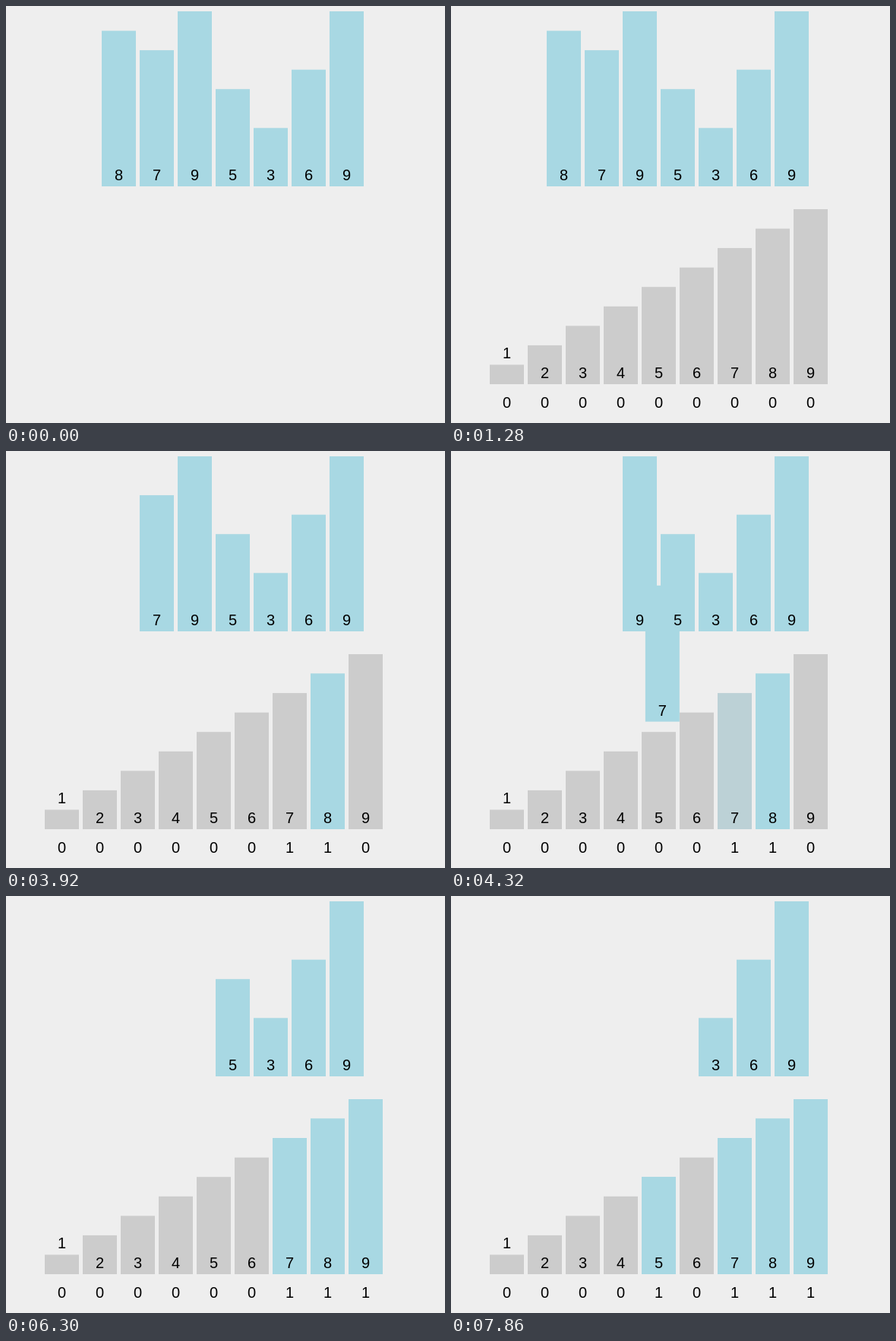
These frames come from a looping animation (578x548 px, 8 s). An HTML page:

```html
<!DOCTYPE html>
<html lang="en">
<head>
<meta charset="utf-8">
<title>Counting sort</title>
<style>
html, body { margin: 0; width: 100%; height: 100%; overflow: hidden; background: #eee; }
svg { display: block; }
text { font: 20px "Liberation Sans", Arial, sans-serif; text-anchor: middle; }
</style>
</head>
<body>
<svg id="stage" width="578" height="548"></svg>
<script>
const LOOP = 8000, DURATION = 600, GROW_AT = 670, SHOW_AT = 580;
const STEP = 50, WIDTH = 45, UNIT = 230 / 9;
const TOP_BASE = 237, LOW_BASE = 497;
const GREY = [204, 204, 204], BLUE = [168, 216, 227];
const values = [8, 7, 9, 5, 3, 6, 9];
// When each value is counted, and when its bar sets off
const moves = [[2260, 2344], [3920, 4030], [5580, 5675], [7160, 7255]];

const stage = document.getElementById('stage');

function add(parent, tag, attrs, text = '') {
  const el = document.createElementNS('http://www.w3.org/2000/svg', tag);
  set(el, attrs);
  el.textContent = text;
  return parent.appendChild(el);
}

function set(el, attrs) {
  for (const key in attrs) el.setAttribute(key, attrs[key]);
}

// Each group's origin is the bar's bottom left corner
function addBar(parent, value, x, base) {
  const height = value * UNIT;
  const group = add(parent, 'g', { transform: `translate(${x} ${base})` });
  const rect = add(group, 'rect', { y: -height, width: WIDTH, height });
  add(group, 'text', { x: WIDTH / 2, y: value > 1 ? -8 : -8 - height }, value);
  return { group, rect, height };
}

const topX = i => 126 + i * STEP;
const lowX = value => 1 + value * STEP;

const topBars = values.map((value, i) => {
  const bar = addBar(stage, value, topX(i), TOP_BASE);
  set(bar.rect, { fill: `rgb(${BLUE})` });
  return bar;
});

const lower = add(stage, 'g', {});
const lowBars = Array.from({ length: 9 }, (_, i) => {
  const value = i + 1, x = lowX(value);
  const bar = addBar(lower, value, x, LOW_BASE);
  bar.count = add(lower, 'text', { x: x + WIDTH / 2, y: 528 }, 0);
  return bar;
});

// Cubic in-out progress of a transition
function progress(time, start) {
  const t = Math.min(1, Math.max(0, (time - start) / DURATION));
  return t < 0.5 ? 4 * t ** 3 : 1 - 4 * (1 - t) ** 3;
}

const mix = (a, b, p) => a + (b - a) * p;

function render(time) {
  const grown = progress(time, GROW_AT);
  lower.style.display = time < SHOW_AT ? 'none' : '';
  for (const { rect, height, count } of lowBars) {
    set(rect, { width: WIDTH * grown, height: height * grown, fill: `rgb(${GREY})` });
    count.textContent = 0;
  }
  moves.forEach(([countAt, start], i) => {
    const value = values[i], bar = lowBars[value - 1];
    const p = progress(time, start);
    const x = mix(topX(i), lowX(value), p), y = mix(TOP_BASE, LOW_BASE, p);
    set(topBars[i].group, { transform: `translate(${x} ${y})` });
    set(bar.rect, { fill: `rgb(${GREY.map((c, k) => Math.round(mix(c, BLUE[k], p)))})` });
    if (time >= countAt) bar.count.textContent = 1;
  });
}

const begin = performance.now();
function frame() {
  render((performance.now() - begin) % LOOP);
  requestAnimationFrame(frame);
}
frame();
</script>
</body>
</html>
```
